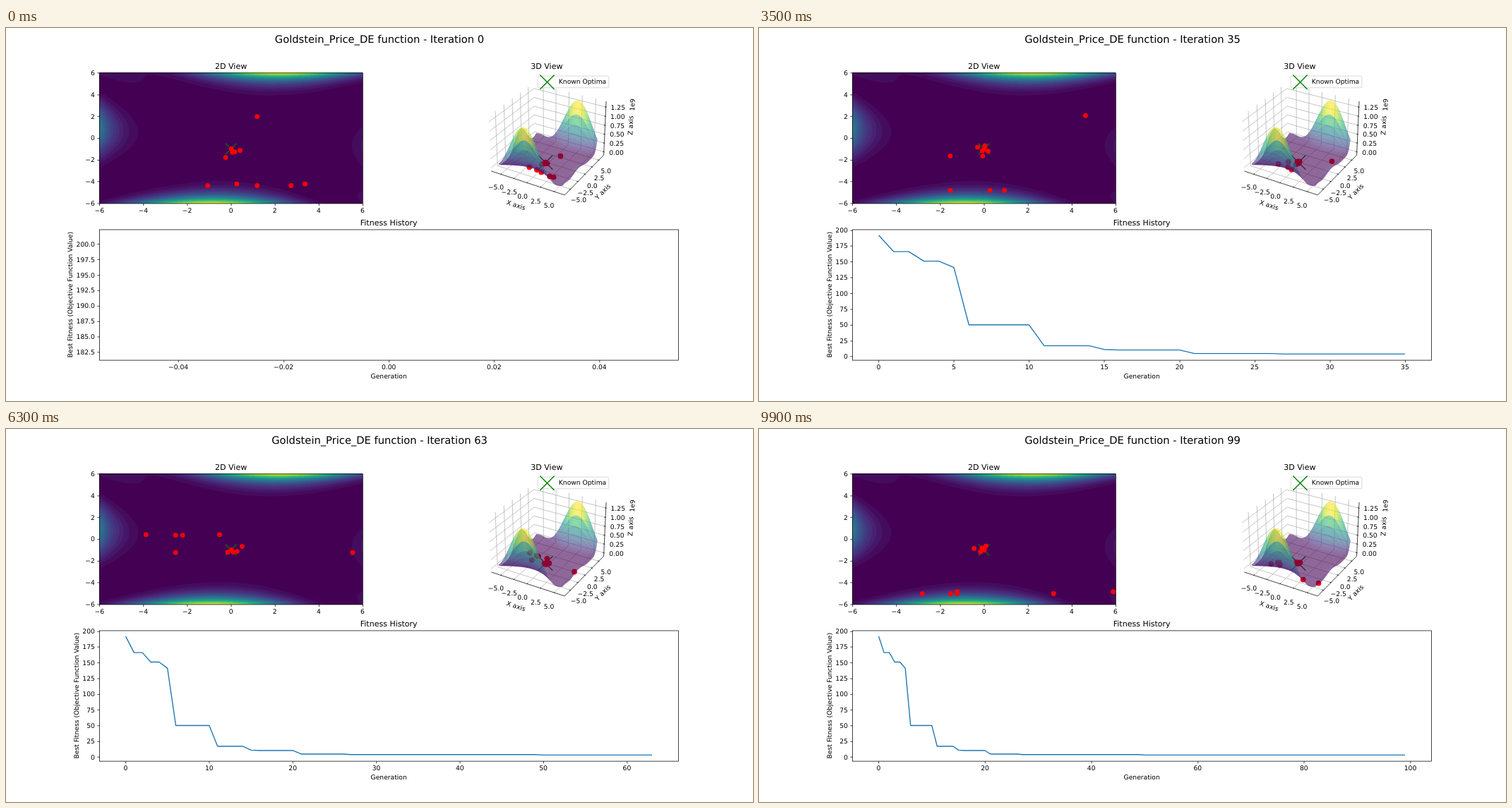
An HTML page with a canvas that plays this animation: 1058 px wide and 529 px high, repeating every 10000 ms.

```html
<!DOCTYPE html>
<html lang="en">
<head>
<meta charset="utf-8">
<title>Optimisation run</title>
<style>
  html, body { margin: 0; width: 100%; height: 100%; overflow: hidden; background: #fff; }
  canvas { display: block; width: 1058px; height: 529px; }
</style>
</head>
<body>
<canvas id="stage" width="1058" height="529"></canvas>
<script>
const W = 1058, H = 529, STEP_MS = 100, GENERATIONS = 100;
const PT = 0.9184;                       // one typographic point in pixels
const GRID = 0.66125;                    // axis lines sit on this raster
const ctx = document.getElementById('stage').getContext('2d');
const MAP = { x: 132.25, y: 63.48, w: 372.7, h: 185.15 };
const CHART = { x: 132.25, y: 285.66, w: 819.95, h: 185.15 };

// Best value, from the generation where it was first reached
const BEST = [[0, 191.8], [1, 166], [3, 151], [5, 141], [6, 50], [11, 17],
  [15, 11], [16, 10.3], [21, 4.7], [27, 3.8], [50, 3.1]];

const cost = (x, y) =>
  (1 + (x + y + 1) ** 2 * (19 - 14 * x + 3 * x * x - 14 * y + 6 * x * y + 3 * y * y)) *
  (30 + (2 * x - 3 * y) ** 2 * (18 - 32 * x + 12 * x * x + 48 * y - 36 * x * y + 27 * y * y));

const clamp = (v, lo, hi) => Math.min(hi, Math.max(lo, v));
const range = n => Array.from({ length: n }, (_, i) => i);
const snap = v => (Math.floor(v / GRID + .5) + .5) * GRID;

const VIRIDIS = ['440154', '482878', '3e4989', '31688e', '26828e', '1f9e89', '35b779',
  '6ece58', 'b5de2b', 'fde725'].map(h => [0, 2, 4].map(i => parseInt(h.substr(i, 2), 16)));

function viridis(t) {
  const p = clamp(t, 0, 1) * 9, i = Math.min(8, Math.floor(p));
  return VIRIDIS[i].map((c, k) => Math.round(c + (VIRIDIS[i + 1][k] - c) * (p - i)));
}

// Crossover makes distant points share columns and rows; the rest crowd the optimum
function swarm(gen) {
  let seed = gen * 7919 + 17;
  const rnd = () => (seed = (seed * 16807) % 2147483647) / 2147483647;
  const spread = s => (rnd() + rnd() + rnd() - 1.5) * s;
  rnd(); rnd();
  const xs = range(5).map(() => spread(6)), ys = range(4).map(() => -1 + spread(4.5));
  const far = range(6).map(i => [xs[i % 5], ys[Math.floor(rnd() * 4)]]);
  const near = range(4).map(() => [spread(.6), -1 + spread(.6)]);
  return [...far, ...near, [0.02, -1]].map(p => p.map(v => clamp(v, -6, 6)));
}

// ---------- drawing helpers ----------
function text(str, x, y, { size = 10, align = 'center', angle = 0, middle = false } = {}) {
  ctx.save();
  ctx.translate(x, y);
  ctx.rotate(angle);
  ctx.font = `${size * PT}px "DejaVu Sans", sans-serif`;
  ctx.textAlign = align;
  ctx.fillStyle = '#000';
  ctx.fillText(str, 0, middle ? size * PT * .365 : 0);
  ctx.restore();
}

function line(points, color = '#000', width = .8) {
  ctx.beginPath();
  points.forEach(p => ctx.lineTo(p[0], p[1]));
  ctx.strokeStyle = color;
  ctx.lineWidth = width * PT;
  ctx.stroke();
}

function cross(x, y, r, width) {
  line([[x - r, y - r], [x + r, y + r]], '#008000', width);
  line([[x - r, y + r], [x + r, y - r]], '#008000', width);
}

function dot([x, y], r) {
  ctx.beginPath();
  ctx.arc(x, y, r, 0, 7);
  ctx.fillStyle = '#f00';
  ctx.fill();
}

function offscreen(w, h) {
  const c = document.createElement('canvas');
  c.width = w;
  c.height = h;
  return c;
}

// Round steps that give at most nine intervals
function ticks(lo, hi) {
  const raw = (hi - lo) / 9, mag = 10 ** Math.floor(Math.log10(raw));
  const step = [1, 2, 2.5, 5, 10].find(s => s * mag >= raw * .999999) * mag;
  let digits = 0;
  while (digits < 6 && Math.abs(step * 10 ** digits - Math.round(step * 10 ** digits)) > 1e-6) digits++;
  const first = Math.ceil(lo / step - 1e-9), count = Math.floor(hi / step + 1e-9) - first + 1;
  return range(count).map(i => {
    const v = (first + i) * step;
    return { v, label: v.toFixed(digits).replace('-', '−') };
  });
}

function axes(box, xTicks, yTicks, toX, toY) {
  const left = snap(box.x), right = snap(box.x + box.w);
  const top = snap(box.y), bottom = snap(box.y + box.h);
  ctx.strokeStyle = '#000';
  ctx.lineWidth = .8 * PT;
  ctx.strokeRect(left, top, right - left, bottom - top);
  for (const { v, label } of xTicks) {
    const x = snap(toX(v));
    line([[x, bottom], [x, bottom + 3.2]]);
    text(label, toX(v), box.y + box.h + 13.4);
  }
  for (const { v, label } of yTicks) {
    const y = snap(toY(v));
    line([[left, y], [left - 3.2, y]]);
    text(label, box.x - 6.4, toY(v), { align: 'right', middle: true });
  }
}

// ---------- 2D map ----------
const mapX = x => MAP.x + (x + 6) / 12 * MAP.w;
const mapY = y => MAP.y + (6 - y) / 12 * MAP.h;

function makeContours() {
  const c = offscreen(746, 370), g = c.getContext('2d'), img = g.createImageData(c.width, c.height);
  const bands = range(33).map(i => viridis(i / 32));
  for (let j = 0, k = 0; j < c.height; j++)
    for (let i = 0; i < c.width; i++, k += 4) {
      const z = cost((i + .5) / c.width * 12 - 6, 6 - (j + .5) / c.height * 12);
      img.data.set(bands[clamp(Math.floor(z / 4e7), 0, 32)], k);
      img.data[k + 3] = 255;
    }
  g.putImageData(img, 0, 0);
  return c;
}

function drawMap(points) {
  text('2D View', 318.6, 58, { size: 12 });
  ctx.drawImage(contours, MAP.x, MAP.y, MAP.w, MAP.h);
  ctx.save();
  ctx.beginPath();
  ctx.rect(MAP.x, MAP.y, MAP.w, MAP.h);
  ctx.clip();
  cross(mapX(0), mapY(-1), 7.8, 1.2);
  points.forEach(([x, y]) => dot([mapX(x), mapY(y)], 3.4));
  ctx.restore();
  const even = ticks(-6, 6);
  axes(MAP, even, even, mapX, mapY);
}

// ---------- 3D view: perspective, elevation 30°, azimuth -60° ----------
const EX = .5952, EZ = .4464;            // half sizes of the axis box

function project(x, y, z) {
  const depth = 10 - (.433 * x - .75 * y + .5 * z);
  return [768.4 + 1000.8 * (.866 * x + .5 * y) / depth,
    153.55 - 1000.8 * (-.25 * x + .433 * y + .866 * z) / depth, depth];
}
const flat = v => v / 6.6 * .5714;
const tall = z => (z - .656e9) / .7216e9 * .4286;
const place = (x, y, z) => project(flat(x), flat(y), tall(z));

function makeSurface() {
  const N = 50, SCALE = 4, c = offscreen(190 * SCALE, 190 * SCALE), g = c.getContext('2d');
  const node = i => -6 + 12 * i / N;
  const quads = [];
  for (let i = 0; i < N; i++)
    for (let j = 0; j < N; j++) {
      const corners = [[i, j], [i + 1, j], [i + 1, j + 1], [i, j + 1]].map(([a, b]) => {
        const x = node(a), y = node(b), z = cost(x, y);
        return { z, p: place(x, y, z) };
      });
      const mean = f => corners.reduce((s, q) => s + f(q), 0) / 4;
      quads.push({ corners, z: mean(q => q.z), depth: mean(q => q.p[2]) });
    }
  const highest = Math.max(...quads.map(q => q.z));
  quads.sort((a, b) => b.depth - a.depth);
  g.scale(SCALE, SCALE);
  g.translate(-672, -62);
  for (const { corners, z } of quads) {
    g.beginPath();
    corners.forEach(({ p }) => g.lineTo(p[0], p[1]));
    g.fillStyle = `rgba(${viridis(z / highest)},.62)`;
    g.fill();
  }
  return c;
}

function drawBox() {
  const path = (...pts) => pts.map(p => project(...p));
  const grid = '#b0b0b0', out = .0095, inn = .019;
  const horizontal = range(5).map(i => (i - 2) * 2.5);
  const vertical = range(6).map(i => i * .25);
  for (const t of horizontal.map(flat)) {
    line(path([t, -EX, -EZ], [t, EX, -EZ], [t, EX, EZ]), grid);
    line(path([EX, t, -EZ], [-EX, t, -EZ], [-EX, t, EZ]), grid);
  }
  for (const t of vertical.map(v => tall(v * 1e9)))
    line(path([-EX, -EX, t], [-EX, EX, t], [EX, EX, t]), grid);
  line(path([-EX, -EX, -EZ], [EX, -EX, -EZ], [EX, EX, -EZ], [EX, EX, EZ]));

  horizontal.forEach((v, i) => {
    const t = flat(v), label = v.toFixed(1).replace('-', '−');
    line(path([t, -EX - out, -EZ], [t, -EX + inn, -EZ]));
    line(path([EX + out, t, -EZ], [EX - inn, t, -EZ]));
    text(label, 694 + 18.75 * i, 226 + 6.5 * i, { middle: true });
    text(label, 811 + 9.7 * i, 244 - 10.4 * i, { middle: true });
  });
  vertical.forEach((v, i) => {
    const t = tall(v * 1e9);
    line(path([EX + out, EX, t], [EX - inn, EX, t]));
    text(v.toFixed(2), 864.5 + .45 * i, 176.8 - 12.85 * i, { middle: true });
  });
  text('X axis', 722.5, 251, { angle: .315, middle: true });
  text('Y axis', 845, 232, { angle: -.79, middle: true });
  text('Z axis', 884.5, 138, { angle: -1.53, middle: true });
  text('1e9', 887, 109, { angle: -1.53, middle: true });
}

function drawLegend() {
  ctx.beginPath();
  ctx.roundRect(753.2, 68.1, 100.7, 16.6, 1.8);
  ctx.fillStyle = 'rgba(255,255,255,.8)';
  ctx.fill();
  ctx.strokeStyle = 'rgba(204,204,204,.8)';
  ctx.lineWidth = PT;
  ctx.stroke();
  cross(766.5, 76.8, 10.2, 1.5);
  text('Known Optima', 782.8, 79.2, { align: 'left' });
}

function drawView(points) {
  text('3D View', 765.9, 58, { size: 12 });
  drawBox();
  const [x, y] = place(0, -1, 3);
  cross(x, y, 10.2, 1.5);
  points.forEach(([px, py]) => dot(place(px, py, cost(px, py)), 3.9));
  ctx.drawImage(surface, 672, 62, 190, 190);
  drawLegend();
}

// ---------- fitness chart ----------
const bestAt = gen => BEST.filter(b => b[0] <= gen).pop()[1];

function drawChart(gen) {
  const top = BEST[0][1], low = bestAt(gen);
  const padX = gen ? gen * .05 : .055;
  const padY = gen ? (top - low) * .05 : top * .055;
  const x0 = -padX, x1 = gen + padX, y0 = low - padY, y1 = top + padY;
  const toX = v => CHART.x + (v - x0) / (x1 - x0) * CHART.w;
  const toY = v => CHART.y + (y1 - v) / (y1 - y0) * CHART.h;
  const yTicks = ticks(y0, y1);

  ctx.lineJoin = 'round';
  if (gen) line(range(gen + 1).map(g => [toX(g), toY(bestAt(g))]), '#1f77b4', 1.5);
  ctx.lineJoin = 'miter';
  axes(CHART, ticks(x0, x1), yTicks, toX, toY);

  ctx.font = `${10 * PT}px "DejaVu Sans", sans-serif`;
  const labelWidth = Math.max(...yTicks.map(t => ctx.measureText(t.label).width));
  text('Best Fitness (Objective Function Value)', CHART.x - 12.2 - labelWidth,
    CHART.y + CHART.h / 2, { angle: -Math.PI / 2 });
  text('Fitness History', 542.2, 280.2, { size: 12 });
  text('Generation', 542.2, 497);
}

const contours = makeContours(), surface = makeSurface();
ctx.imageSmoothingQuality = 'high';
ctx.textRendering = 'geometricPrecision';

function draw(gen) {
  const points = swarm(gen);
  ctx.fillStyle = '#fff';
  ctx.fillRect(0, 0, W, H);
  text(`Goldstein_Price_DE function - Iteration ${gen}`, W / 2, 20.9, { size: 16 });
  drawMap(points);
  drawView(points);
  drawChart(gen);
}

const start = performance.now();
let shown = -1;
function tick() {
  const gen = Math.floor((performance.now() - start) / STEP_MS) % GENERATIONS;
  if (gen !== shown) draw(shown = gen);
  requestAnimationFrame(tick);
}
tick();
</script>
</body>
</html>
```
